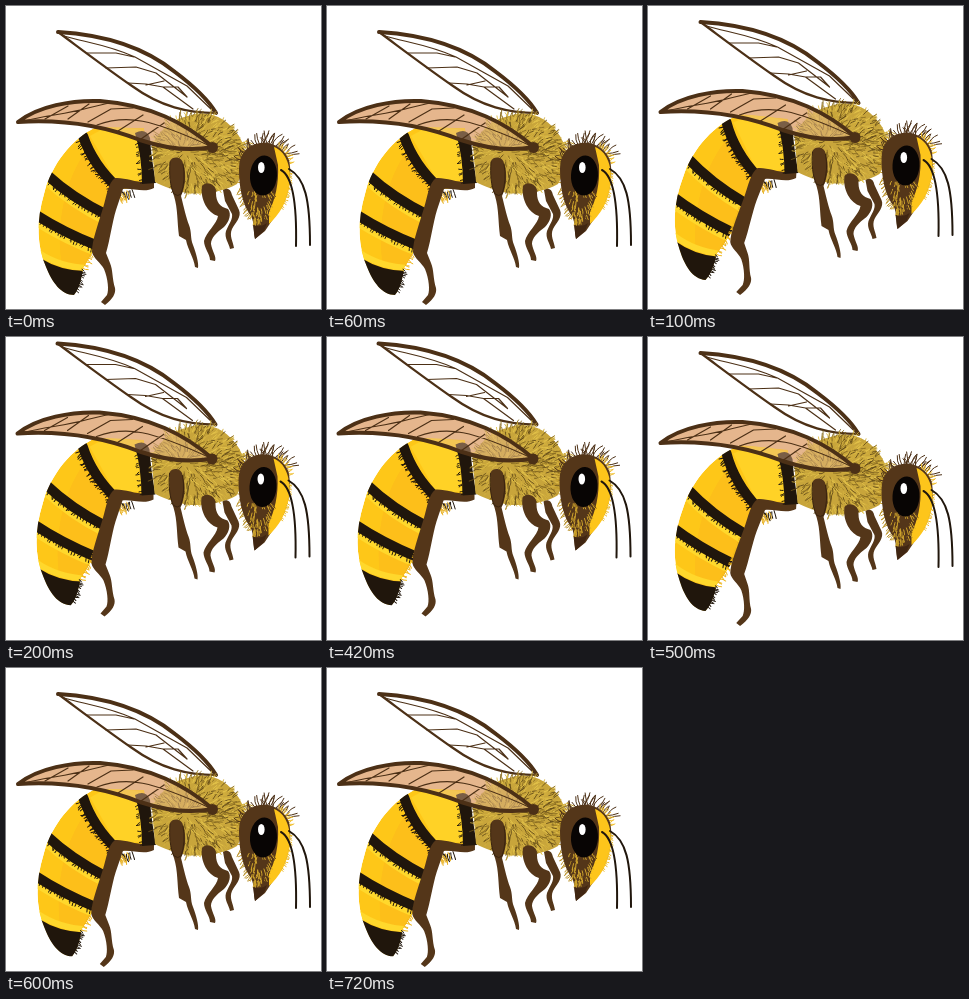
Recreate the animation shown at these times as an HTML page with a canvas. Size 315 by 303 pixels, loop 800 ms.

```html
<!DOCTYPE html>
<html lang="en">
<head>
<meta charset="utf-8">
<title>Bee</title>
<style>
html, body { margin: 0; height: 100%; overflow: hidden; background: #fff; }
canvas { display: block; }
</style>
</head>
<body>
<canvas id="stage" width="315" height="303"></canvas>
<script>
const c = document.getElementById('stage').getContext('2d');
const BROWN = '#543619', EDGE = '#4c3016', BLACK = '#20160c', PEACH = '#e5b58d';
const LOOP = 800;

// start time, body shift, abdomen turn in radians and rear leg slant
const POSES = [
  { at: 0, x: 0, y: 0, belly: 0, slant: 0 },
  { at: 100, x: 0.5, y: -10, belly: 0.075, slant: 0.06 },
  { at: 200, x: -0.5, y: -19.5, belly: 0.018, slant: 0 },
  { at: 500, x: 0.5, y: -10, belly: 0.075, slant: 0.06 },
  { at: 600, x: 0, y: 0, belly: 0.012, slant: 0.01 }
];

const NEAR_WING = 'M12 116C32 100 66 94 94 95C145 99 179 117 207 141C182 146 158 142 134 134C98 120 57 113 12 116Z';

let seed = 1;
const rand = () => (seed = seed * 16807 % 2147483647) / 2147483647;
const spread = n => (rand() - 0.5) * 2 * n;

function fill(d, color) {
  c.fillStyle = color;
  c.fill(new Path2D(d));
}

function line(d, color, width) {
  c.strokeStyle = color;
  c.lineWidth = width;
  c.stroke(new Path2D(d));
}

function oval(x, y, rx, ry, color, turn = 0) {
  c.fillStyle = color;
  c.beginPath();
  c.ellipse(x, y, rx, ry, turn, 0, 7);
  c.fill();
}

function hair(x, y, angle, length, color, width = 1) {
  const dx = Math.cos(angle) * length, dy = Math.sin(angle) * length, bend = spread(0.25);
  c.strokeStyle = color;
  c.lineWidth = width;
  c.beginPath();
  c.moveTo(x, y);
  c.quadraticCurveTo(x + dx / 2 - dy * bend, y + dy / 2 + dx * bend, x + dx, y + dy);
  c.stroke();
}

// hairs along a quadratic curve, leaning from one angle to another
function fringe([x0, y0, x1, y1, x2, y2], count, angle, length, color, end = angle) {
  for (let i = 0; i < count; i++) {
    const t = (i + rand()) / count, u = 1 - t;
    hair(u * u * x0 + 2 * u * t * x1 + t * t * x2, u * u * y0 + 2 * u * t * y1 + t * t * y2,
      u * angle + t * end + spread(0.45), length * (0.6 + rand() * 0.6), color);
  }
}

function farWing() {
  const top = 'M52 26C103 29 142 44 169 66C189 81 203 95 210 107';
  const low = 'C182 107 155 101 126 80C100 62 79 46 52 26Z';
  fill(top + low, '#fff');
  line('M58 30C78 36 103 39 129 51L181 80L207 105M81 47L110 47L128 51M100 62L130 61L150 67L181 91' +
    'M122 77L140 78L157 81L187 103M140 79L158 75M157 81L172 81L181 91', EDGE, 1.2);
  line(top + low, EDGE, 2.2);
  line(top, EDGE, 4);
}

function nearWing() {
  // translucent, so that the body shows through
  c.globalAlpha = 0.45;
  fill(NEAR_WING, PEACH);
  c.globalAlpha = 1;
  line('M17 115C43 109 60 108 82 102L103 97M39 113L62 100M62 113L83 98M82 116L105 103L127 102' +
    'M91 119C121 108 145 113 204 140M112 125L137 109M135 133L158 117', EDGE, 1.2);
  line(NEAR_WING, EDGE, 4);
  oval(206.5, 141.5, 5.5, 5.5, EDGE);
}

function abdomen() {
  const shape = 'M90 121C66 133 46 157 38 188C30 215 31 241 40 261C46 276 55 289 68 289C74 282 76 270 77 262' +
    'C88 246 98 226 101 205L113 182C122 185 138 180 148 174L138 122Z';
  const bands = ['M77 130Q87 159 112 182', 'M40 168Q66 192 101 209', 'M27 207Q56 226 92 240'];
  c.save();
  c.clip(new Path2D(shape));
  fill(shape, '#fec718');
  fill('M80 145C60 173 49 214 56 262L78 270L112 182L92 164Z', '#fdbf1a');
  fill('M84 130L104 119L135 124L141 172L112 178Z', '#ffd226');
  c.save();
  c.translate(-1, 7);
  bands.slice(1).forEach(d => line(d, '#ffd82c', 7));
  c.restore();
  bands.forEach(d => line(d, BLACK, 10));
  line('M33 247Q54 261 82 262', '#ffd82c', 6);
  fill('M34 252Q55 265 79 265L76 292L45 292Z', BLACK);
  c.restore();
  fringe([76, 134, 86, 160, 108, 182], 26, 2.6, 6, BLACK);
  fringe([43, 175, 66, 195, 94, 209], 18, 2, 4, BLACK);
  fringe([34, 215, 59, 230, 86, 242], 18, 2, 4, BLACK);
  fringe([96, 213, 92, 235, 76, 264], 25, 0.65, 5, '#eeb51b');
  fringe([76, 263, 76, 273, 69, 286], 12, 0.5, 4, BLACK);
}

function rearLeg() {
  fringe([112, 182, 116, 190, 127, 183], 10, 1.3, 7, BLACK);
  fringe([109, 184, 109, 192, 122, 184], 10, 1.1, 10, '#e9b224');
  fill('M148 175C135 179 120 171 109 172C102 177 101 189 97 202C92 219 86 234 86 246C87 252 95 257 98 263' +
    'C102 273 103 284 101 289L95 296L99 299C107 293 110 287 109 282C106 273 107 264 104 257L100 247' +
    'C104 234 106 217 110 204L117 183C127 182 139 187 148 182Z', BROWN);
}

function thorax() {
  fill('M129 127Q140 121 144 132Q145 150 150 177L136 178Q136 151 129 127Z', BLACK);
  fringe([132, 136, 133, 156, 137, 178], 12, 2.8, 3, BLACK);
  fill('M146 140C152 125 167 113 182 110C201 103 221 111 233 130C243 147 240 164 231 178' +
    'C218 186 194 189 180 187C168 184 156 180 149 176Z', '#c8a53b');
  // hairs point away from the wing side of the body
  const tones = ['#e2c24a', '#8a6d22', '#d3b03f', '#644c19'];
  for (let i = 0; i < 620; i++) {
    const a = rand() * 6.283, r = Math.sqrt(rand());
    const x = 192 + Math.cos(a) * r * 44, y = 147 + Math.sin(a) * r * 38;
    hair(x, y, Math.atan2(y - 145, x - 178) + spread(0.55), 4 + rand() * 5, tones[i % 4], 0.9);
  }
}

function legs() {
  fill('M164 155C167 149 177 151 177 158C181 168 179 182 175 190C178 202 180 211 183 219C186 227 184 231 187 239' +
    'C190 247 193 257 192 262L189 261C188 252 182 244 180 234L173 230C171 216 172 203 168 190C163 179 164 166 164 155Z', BROWN);
  line('M164 156C163 168 164 180 168 188Q172 191 175 188Q180 174 177 158', '#39230f', 1);
  fill('M196 180C201 174 211 179 210 187C210 196 214 201 222 203C226 208 223 216 218 221C210 227 205 232 205 238' +
    'C206 245 211 251 209 255L204 254C204 248 198 242 198 235C200 226 211 218 212 210C202 207 194 194 196 180Z', BROWN);
  fill('M217 184Q224 180 226 189L233 204C236 211 229 217 226 223C223 230 227 235 228 242L224 243' +
    'C223 237 218 232 220 225C223 218 227 213 226 208L219 195Z', BROWN);
}

function head() {
  fringe([234, 177, 232, 149, 247, 138], 20, 3.3, 7, '#c19a2c', 4);
  fringe([236, 155, 241, 139, 261, 136], 16, 3.9, 9, EDGE, 4.6);
  fringe([256, 137, 271, 136, 282, 151], 18, 4.7, 12, EDGE, 5.9);
  fringe([272, 141, 281, 146, 284, 158], 14, 5.1, 5, '#f0be2c', 6);
  fringe([234, 181, 238, 200, 246, 211], 16, 2.4, 5, '#b99128');
  fill('M233 163C233 148 241 139 254 137C268 135 279 144 283 154C287 173 282 196 267 213L259 225L249 233' +
    'C247 226 249 218 245 210C236 198 233 181 233 163Z', BROWN);
  fill('M268 141C279 145 285 158 284 177C281 197 273 209 263 218L263 206C269 194 273 178 272 159Z', '#fdc51b');
  for (let i = 0; i < 75; i++) {
    const y = 185 + rand() * 30, x = 253 + spread(14 - (y - 185) * 0.3);
    hair(x, y, 1.5 + (253 - x) * 0.045, 3 + rand() * 4, i % 3 ? '#d0a52c' : BROWN);
  }
  fringe([283, 163, 286, 181, 275, 203], 20, 0.55, 3, '#e8b626');
  fill('M247 219Q255 222 261 217L258 225L249 233Z', '#402612');
  oval(257.5, 169.5, 13.5, 20, '#080504', 0.06);
  oval(255.3, 161.5, 3.3, 5.5, '#fff');
}

function antennae() {
  line('M275 164C286 170 291 195 290 240', BLACK, 2);
  line('M283 163C299 172 304 193 304 239', BLACK, 2);
}

function draw(pose) {
  seed = 271;
  c.clearRect(0, 0, 315, 303);
  c.save();
  c.translate(pose.x, pose.y);
  farWing();
  fill(NEAR_WING, PEACH);

  c.save();
  c.translate(130, 140);
  c.rotate(pose.belly);
  c.translate(-130, -140);
  abdomen();
  c.restore();

  c.save();
  c.transform(1, 0, -pose.slant, 1, pose.slant * 175, 0);
  rearLeg();
  c.restore();

  thorax();
  legs();
  nearWing();
  head();
  antennae();
  c.restore();
}

c.lineCap = c.lineJoin = 'round';
let shown;
function tick(now) {
  const t = now % LOOP;
  const pose = POSES.findLast(p => p.at <= t);
  if (pose !== shown) draw(shown = pose);
  requestAnimationFrame(tick);
}
tick(0);
</script>
</body>
</html>
```
